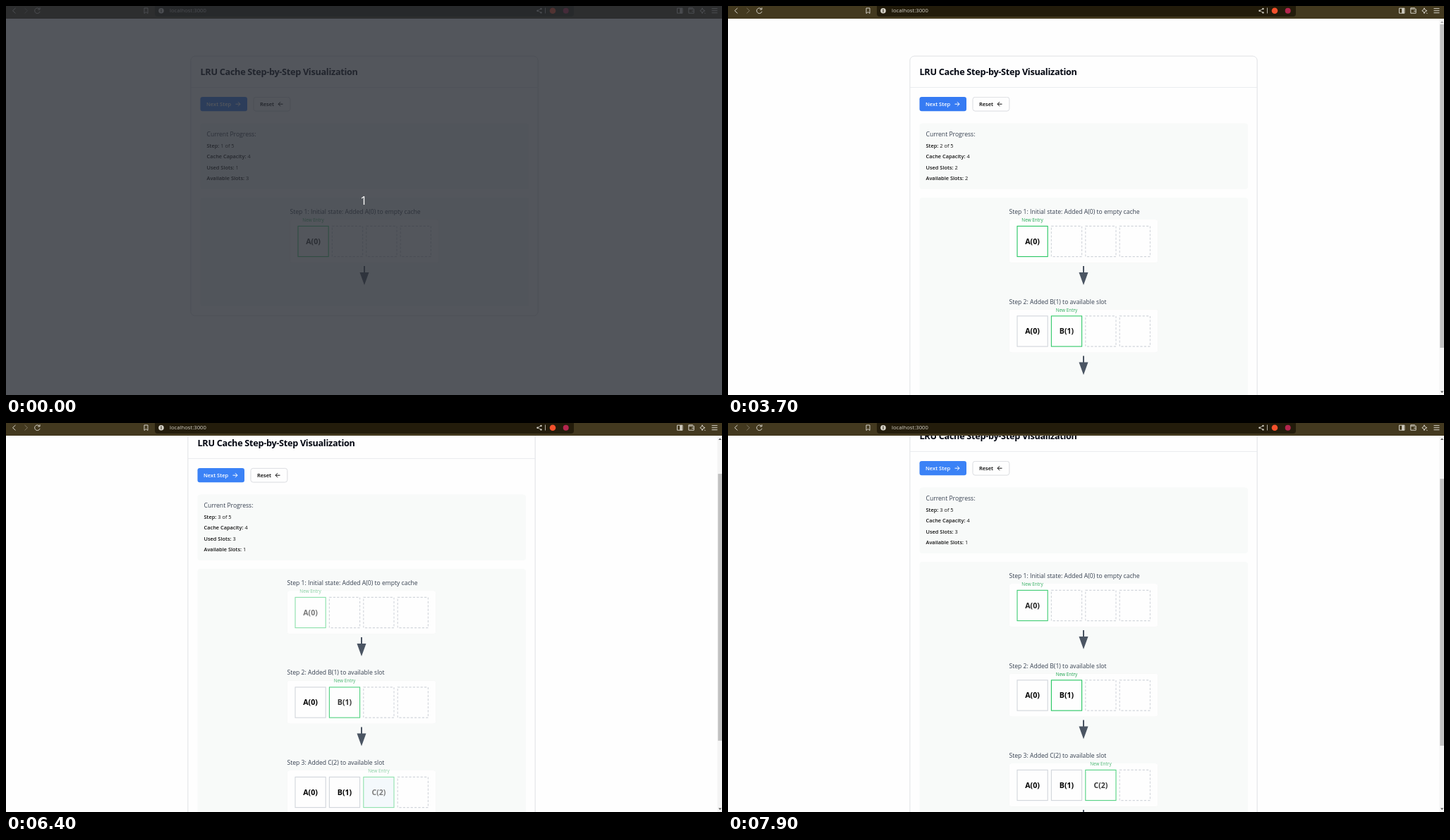
Recreate the animation shown at these times as an HTML page. Size 1015 by 552 pixels, loop 8000 ms.

```html
<!DOCTYPE html>
<html lang="en">
<head>
<meta charset="utf-8">
<title>LRU Cache Step-by-Step Visualization</title>
<style>
  html, body { margin: 0; height: 100%; overflow: hidden; background: #fefefe; }
  svg { display: block; width: 1015px; height: 552px; font-family: "Open Sans", "Noto Sans", sans-serif; }
  .title { font-size: 12.7px; font-weight: 700; letter-spacing: -.3px; fill: #030712; }
  .button { font-size: 7.5px; font-weight: 600; }
  .head { font-size: 8.6px; font-weight: 500; fill: #374151; }
  .line { font-size: 7.4px; fill: #111; }
  .line tspan:first-child { font-weight: 600; }
  .key { font-size: 10.6px; font-weight: 700; text-anchor: middle; }
  .tag { font-size: 6.4px; text-anchor: middle; fill: #16a34a; }
  .url { font-size: 7.7px; fill: #d6d2c8; }
  .count { font-size: 17px; text-anchor: middle; fill: #fff; }
  .card { filter: drop-shadow(0 .6px .7px #0002); }
  .box { filter: drop-shadow(0 .5px .5px #0001); }
  .icon { fill: none; stroke: #d6d2c8; stroke-width: 1; }
</style>
</head>
<body>
<svg id="stage" viewBox="0 0 1015 552"></svg>
<script>
const LOOP = 8000, TOP = 18, VIEW = 534, ROW = 127.5, PITCH = 48.4;
const steps = [
  { text: 'Initial state: Added A(0) to empty cache', at: -Infinity, pulse: 1560 },
  { text: 'Added B(1) to available slot', at: 1950, pulse: 1950 },
  { text: 'Added C(2) to available slot', at: 5430, pulse: 5430 }
];
const keys = ['A(0)', 'B(1)', 'C(2)'];
const hovers = [[1100, 3600], [5200, 6000]];
const scrolls = [[4150, 4700, 65], [6400, 6800, 121.5], [7400, 7900, -111.5]];

const rect = (x, y, w, h, fill, more = '') =>
  `<rect x="${x}" y="${y}" width="${w}" height="${h}" fill="${fill}" ${more}/>`;
const text = (x, y, cls, str, more = '') => `<text x="${x}" y="${y}" class="${cls}" ${more}>${str}</text>`;
const path = (d, more = '') => `<path d="${d}" ${more}/>`;

function cell(row, i) {
  const x = 414 + i * PITCH, y = 312.4, mid = x + 21.6;
  const isNew = i === row, empty = i > row;
  const stroke = isNew ? '#22c55e' : '#d1d5db';
  const frame = rect(x, y, 43.2, 43.2, empty ? 'none' : '#fefefe',
    `stroke="${stroke}" stroke-width="1.1" ${empty ? 'stroke-dasharray="3.2 2.2"' : ''} ${isNew ? `id="fresh${row}"` : ''}`);
  if (empty) return frame;
  const tag = isNew ? text(mid, 306, 'tag', 'New Entry') : '';
  return `<g ${isNew ? `id="pulse${row}"` : ''}>${frame}${text(mid, 337.6, 'key', keys[i])}${tag}</g>`;
}

function stepRow(step, row) {
  return `<g id="row${row}" transform="translate(0 ${row * ROW})">` +
    text(402.5, 295, 'head', `Step ${row + 1}: ${step.text}`) +
    rect(402.5, 303, 211, 61.3, '#fefefe', 'rx="4" class="box"') +
    [0, 1, 2, 3].map(i => cell(row, i)).join('') +
    path('M507 369h2v9h5.5l-6.5 18l-6.5 -18h5.5z', 'fill="#4b5563"') + '</g>';
}

const info = (y, label, id) =>
  text(284.5, y, 'line', `<tspan>${label}:</tspan> <tspan id="${id}"></tspan>`);

const page = `<g id="page">
  ${rect(262, 71.2, 492, 368.4, '#fefefe', 'id="card" rx="6" stroke="#e2e5e9" stroke-width=".8" class="card"')}
  ${path('M262 115.5h492', 'stroke="#e5e7eb" stroke-width=".8"')}
  ${text(275.5, 97.8, 'title', 'LRU Cache Step-by-Step Visualization')}
  ${rect(275.5, 129, 66.5, 20.2, '#3b82f6', 'id="next" rx="3.2"')}
  ${text(284, 141.8, 'button', 'Next Step', 'fill="#fff"')}
  ${path('M325.5 139.2h6.5m-3 -3l3 3l-3 3', 'fill="none" stroke="#fff"')}
  ${rect(351, 129.4, 51.8, 19.6, '#fefefe', 'rx="3.2" stroke="#d6d9de" stroke-width=".8" class="box"')}
  ${text(360, 141.8, 'button', 'Reset')}
  ${path('M392.5 139.2h-6.5m3 -3l-3 3l3 3', 'fill="none" stroke="#111"')}
  ${rect(275.5, 166.5, 465.5, 93.5, '#f8faf9', 'rx="4"')}
  ${text(284.5, 185, 'head', 'Current Progress:')}
  ${info(201, 'Step', 'stepNo')}
  ${info(216.4, 'Cache Capacity', 'capacity')}
  ${info(231.8, 'Used Slots', 'used')}
  ${info(247.2, 'Available Slots', 'free')}
  ${rect(275.5, 272, 465.5, 154, '#f8faf9', 'id="panel" rx="4"')}
  ${steps.map(stepRow).join('')}
</g>`;

const scrollbar = `<g id="bar">
  ${rect(1008.5, TOP, 6.5, VIEW, '#f4f4f4')}
  ${rect(1009.3, 26, 5.7, 1, '#c1c1c1', 'id="thumb"')}
  ${path('M1010 24h4.4l-2.2 -2.6z', 'id="up"')}
  ${path('M1010 546.5h4.4l-2.2 2.6z', 'id="down"')}
</g>`;

const browser = rect(0, 0, 1015, TOP, '#43391f') +
  path('M211 0h594v11q0 4 -4 4h-586q-4 0 -4 -4z', 'fill="#231c0b"') +
  `<g class="icon">` +
  path('M13.5 3l-4 3.7l4 3.7M47.3 4.2a3.8 3.8 0 1 0 .8 3.6M48 2.2v2.8h-2.8') +
  path('M26.5 3l4 3.7l-4 3.7', 'opacity=".4"') +
  path('M196 3h5v7.5l-2.5 -2l-2.5 2z') +
  path('M758.5 4l-5 2.7l5 2.7M764.5 2.5v8', 'stroke-width=".8"') +
  path('M951.5 3.2h7.5v7h-7.5z') +
  path('M956.8 3.2v7', 'stroke-width="3"') +
  path('M967.8 4.2v6h7.4v-6zv-1.4h6M972.2 7.2h3') +
  path('M987 2.8l1.2 2.7l2.8 1.2l-2.8 1.2l-1.2 2.7l-1.2 -2.7l-2 -1.2l2 -1.2zM990 9.5l1.5 1.5') +
  path('M1000.5 3.7h8m-8 3h8m-8 3h8') + '</g>' +
  `<circle cx="220" cy="6.7" r="3.8" fill="#d6d2c8"/>` + rect(219.5, 4.4, 1, 4.6, '#231c0b') +
  `<g fill="#d6d2c8"><circle cx="758.5" cy="4" r="1.2"/><circle cx="753.5" cy="6.7" r="1.2"/><circle cx="758.5" cy="9.4" r="1.2"/></g>` +
  `<circle cx="775" cy="6.7" r="4.3" fill="#f4512c"/><circle cx="793.7" cy="6.7" r="4" fill="#b5264f"/>` +
  text(232, 9.4, 'url', 'localhost:3000');

document.getElementById('stage').innerHTML =
  rect(0, 0, 1015, 552, '#fefefe') + page + scrollbar + browser +
  `<g id="overlay">${rect(0, 0, 1015, 552, 'rgba(40,44,52,.8)')}${text(507, 282, 'count', '1')}</g>`;

const $ = id => document.getElementById(id);
const set = (id, attrs) => { for (const k in attrs) $(id).setAttribute(k, attrs[k]); };
const show = (id, on) => set(id, { display: on ? 'inline' : 'none' });
const clamp = v => Math.min(1, Math.max(0, v));

// cubic-bezier(.4, 0, .6, 1)
function ease(x) {
  let s = x;
  for (let i = 0; i < 4; i++) s -= (1.2 * s - .6 * s * s + .4 * s ** 3 - x) / (1.2 - 1.2 * s + 1.2 * s * s);
  return s * s * (3 - 2 * s);
}
const ramp = (t, from, to) => ease(clamp((t - from) / (to - from)));

function pulse(t, start) {
  const p = (t - start + 4000) % 2000 / 1000;
  return 1 - .5 * ease(p < 1 ? p : 2 - p);
}
const mix = (a, b, k) => `rgb(${a.map((v, i) => Math.round(v + (b[i] - v) * k))})`;

function draw(t) {
  const count = steps.filter(s => t >= s.at).length;
  const extra = (count - 1) * ROW;
  const scroll = scrolls.reduce((sum, [from, to, by]) => sum + by * ramp(t, from, to), 0);
  const hover = hovers.reduce((sum, [on, off]) => sum + ramp(t, on, on + 150) - ramp(t, off, off + 150), 0);

  set('page', { transform: `translate(${count > 1 ? -4 : 0} ${-scroll})` });
  set('card', { height: 368.4 + extra });
  set('panel', { height: 154 + extra });
  set('next', { fill: mix([59, 130, 246], [37, 99, 235], hover) });
  $('stepNo').textContent = `${count} of 5`;
  $('capacity').textContent = 4;
  $('used').textContent = count;
  $('free').textContent = 4 - count;

  steps.forEach((s, i) => {
    show('row' + i, i < count);
    set('pulse' + i, { opacity: pulse(t, s.pulse) });
    const glow = i ? 1 - ramp(t, s.at + 1000, s.at + 1160) : 0;
    set('fresh' + i, { fill: mix([254, 254, 254], [236, 246, 251], glow) });
  });

  const content = 474 + extra, track = 517, ratio = track / content;
  show('bar', count > 1);
  set('thumb', { y: 26 + scroll * ratio, height: VIEW * ratio });
  set('up', { fill: scroll > .5 ? '#505050' : '#a3a3a3' });
  set('down', { fill: '#505050' });
  show('overlay', t < 100);
}

const begin = performance.now();
function tick() {
  draw((performance.now() - begin) % LOOP);
  requestAnimationFrame(tick);
}
draw(0);
tick();
</script>
</body>
</html>
```
